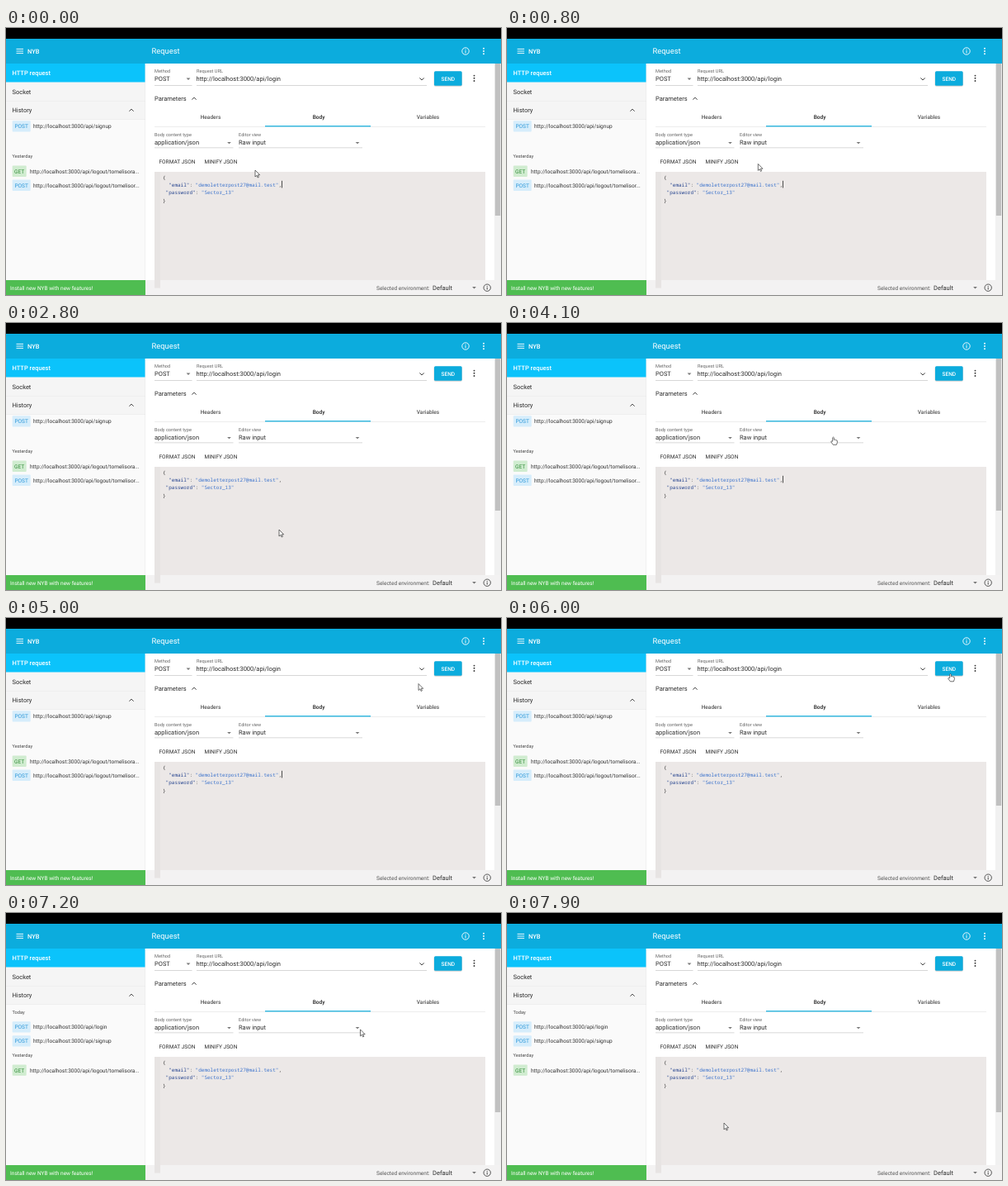
Animation of 600 by 323 pixels, one loop 8000 ms. Source, as an HTML page:

```html
<!DOCTYPE html>
<html lang="en">
<head>
<meta charset="utf-8">
<title>Request</title>
<style>
html, body { margin: 0; width: 100%; height: 100%; overflow: hidden; background: #fff; }
svg { display: block; width: 600px; height: 323px; }
text { font-family: Roboto, Arial, sans-serif; text-rendering: geometricPrecision; white-space: pre; }
.mono { font-family: "Noto Sans Mono", "DejaVu Sans Mono", monospace; }
</style>
</head>
<body>
<svg id="stage" viewBox="0 0 600 323"></svg>
<script>
const NS = "http://www.w3.org/2000/svg";
const stage = document.getElementById("stage");
const LOOP = 8000, STEP = 100;
const SMALL = 5.625, BODY = 6.5625, LARGE = 7.5, TITLE = 9.375;
const BLUE = "#0cacdd", INK = "#2b2b2b", GREY = "#666";

function add(parent, tag, attrs) {
  const el = document.createElementNS(NS, tag);
  for (const k in attrs) el.setAttribute(k, attrs[k]);
  parent.appendChild(el);
  return el;
}
const group = (parent = stage) => add(parent, "g", {});
const rect = (g, x, y, width, height, fill, rx = 0) =>
  add(g, "rect", { x, y, width, height, fill, rx });
const dot = (g, cx, cy, r, fill) => add(g, "circle", { cx, cy, r, fill });
const stroke = (g, d, color, w = 1) =>
  add(g, "path", { d, fill: "none", stroke: color, "stroke-width": w });

// y is the middle of the capital letters
function label(g, str, x, y, size, fill = INK, weight = 400, anchor = "start") {
  const el = add(g, "text", {
    x, y: y + size * 0.355, "font-size": size, fill,
    "font-weight": weight, "text-anchor": anchor
  });
  el.textContent = str;
  return el;
}

const caretDown = (x, y) =>
  add(stage, "path", { d: `M${x - 2.4} ${y - 1.1}h4.8l-2.4 2.4z`, fill: "#777" });
const chevron = (x, y, up) => {
  const s = up ? -1 : 1;
  stroke(stage, `M${x - 2.6} ${y - 1.3 * s}l2.6 ${2.6 * s}l2.6 ${-2.6 * s}`, "#444", 1);
};
const dots = (x, y, fill) => [-3.2, 0, 3.2].forEach(d => dot(stage, x, y + d, 0.95, fill));
function info(x, y, color) {
  add(stage, "circle", { cx: x, cy: y, r: 4.2, fill: "none", stroke: color, "stroke-width": 0.9 });
  stroke(stage, `M${x} ${y - 0.6}v2.9M${x} ${y - 2.3}v1`, color, 0.95);
}
const underline = (x, y, w) => rect(stage, x, y, w, 0.6, "#bdbdbd");

function drawFrame() {
  rect(stage, 0, 0, 600, 323, "#fff");
  rect(stage, 0, 0, 600, 13, "#000");
  rect(stage, 0, 13, 600, 30, BLUE);
  stroke(stage, "M12.5 25.4h8.5M12.5 28h8.5M12.5 30.6h8.5", "#fff", 0.9);
  label(stage, "NYB", 26, 28, LARGE, "#fff", 500);
  label(stage, "Request", 176.5, 28, TITLE, "#fff");
  info(557, 28, "#fff");
  dots(579, 28, "#fff");
}

function drawSidebar() {
  rect(stage, 0, 43, 169, 262, "#fafafa");
  rect(stage, 0, 65.5, 169, 45, "#f5f5f5");
  rect(stage, 0, 43, 169, 22.5, "#0bc3fb");
  rect(stage, 0, 88, 169, 0.5, "#e9e9e9");
  rect(stage, 0, 110.2, 169, 0.5, "#e4e4e4");
  rect(stage, 168.5, 43, 0.5, 262, "#e6e6e6");
  label(stage, "HTTP request", 7.5, 54.3, LARGE, "#fff", 500);
  label(stage, "Socket", 7.5, 77, LARGE);
  label(stage, "History", 7.5, 99.4, LARGE);
  chevron(152, 99.4, true);
  rect(stage, 0, 305, 169, 18, "#4fbd51");
  label(stage, "Install new NYB with new features!", 5, 314.2, BODY, "#fff");
}

function drawRequest() {
  label(stage, "Method", 180, 51.8, SMALL, GREY);
  label(stage, "POST", 180, 61.7, LARGE);
  caretDown(221, 61.7);
  underline(180, 69.2, 45.5);
  label(stage, "Request URL", 231, 51.8, SMALL, GREY);
  label(stage, "http://localhost:3000/api/login", 230.5, 61.7, LARGE);
  chevron(504, 61.7, false);
  underline(231, 69.2, 279);
  rect(stage, 518.6, 52.8, 34.4, 18, "#00000030", 2);
  rect(stage, 519, 52.2, 33.6, 17.6, BLUE, 1.5);
  dots(567.5, 60.8, "#333");

  label(stage, "Parameters", 180, 85.4, LARGE);
  chevron(228, 85.4, true);
  label(stage, "Headers", 248, 107.8, BODY, "#555", 500, "middle");
  label(stage, "Body", 379, 107.8, BODY, "#222", 500, "middle");
  label(stage, "Variables", 511.5, 107.8, BODY, "#555", 500, "middle");
  rect(stage, 180, 119, 401, 0.6, "#e2e2e2");
  rect(stage, 314, 118.2, 128, 1.2, BLUE);

  label(stage, "Body content type", 180, 128.8, SMALL, GREY);
  label(stage, "application/json", 180, 138.8, LARGE);
  caretDown(270.5, 139);
  underline(180, 144.6, 95.5);
  label(stage, "Editor view", 282, 128.8, SMALL, GREY);
  label(stage, "Raw input", 282, 138.8, LARGE);
  caretDown(426, 139);
  underline(282, 144.6, 150);
  label(stage, "FORMAT JSON", 185.5, 161.2, BODY);
  label(stage, "MINIFY JSON", 240.5, 161.2, BODY);
}

function drawEditor() {
  rect(stage, 169, 305, 431, 18, "#f3f2f2");
  rect(stage, 187, 174, 394, 131, "#ece8e7");
  rect(stage, 180, 174, 7, 140.5, "#e7e4e3");
  const code = [
    [["{", "#333"]],
    [['  "email"', "#27458f"], [": ", "#444"], ['"demoletterpost27@mail.test"', "#3c73cc"], [",", "#444"]],
    [[' "password"', "#27458f"], [": ", "#444"], ['"Sector_13"', "#3c73cc"]],
    [["}", "#333"]]
  ];
  code.forEach((parts, i) => {
    const line = label(stage, "", 190, 180.5 + i * 9.4, 6);
    line.setAttribute("class", "mono");
    for (const [str, fill] of parts) add(line, "tspan", { fill }).textContent = str;
  });
  label(stage, "Selected environment:", 449, 314.2, BODY, "#555");
  label(stage, "Default", 517, 314.2, LARGE);
  caretDown(567.5, 314.2);
  info(583.2, 314.2, "#444");
  rect(stage, 592, 43, 8, 262, "#f1f1f1");
}

function historyRow(g, y, method, path) {
  const post = method === "POST", w = post ? 22 : 17;
  rect(g, 7.7, y - 6.8, w, 13.4, post ? "#d6edfb" : "#d0ecd0", 1);
  label(g, method, 7.7 + w / 2, y, BODY, post ? "#2b97d8" : "#2f8a35", 400, "middle");
  label(g, "http://localhost:3000/api/" + path, post ? 33 : 29, y, BODY, "#333");
}

function drawHistories() {
  const logout = "logout/tomelisora...";
  const before = group(), after = group();
  historyRow(before, 119, "POST", "signup");
  label(before, "Yesterday", 7.5, 155.4, SMALL, "#444");
  historyRow(before, 173.4, "GET", logout);
  historyRow(before, 190.4, "POST", "logout/tomelisor...");
  label(after, "Today", 7.5, 119.6, SMALL, "#444");
  historyRow(after, 138, "POST", "login");
  historyRow(after, 155, "POST", "signup");
  label(after, "Yesterday", 7.5, 172.4, SMALL, "#444");
  historyRow(after, 190.2, "GET", logout);
  return [before, after];
}

drawFrame();
drawSidebar();
drawRequest();
drawEditor();
const [oldList, newList] = drawHistories();
const thumb = rect(stage, 592.8, 43, 6.4, 184, "#c1c1c1");
const send = label(stage, "SEND", 535.8, 61.2, BODY, "#fff", 500, "middle");
const caret = rect(stage, 334.1, 184.8, 0.8, 8.6, "#222");
const pointer = group();
const arrow = add(pointer, "path", {
  d: "M0 0V8L1.9 6.3L3.1 9L4.4 8.4L3.2 5.8H5.7Z",
  fill: "#fff", stroke: "#333", "stroke-width": 0.7, "stroke-linejoin": "round"
});
const hand = add(pointer, "path", {
  d: "M-.8 5.2V.7Q0-.6.8.7V3.2Q1.8 2.6 2.3 3.5Q3.2 3 3.6 3.9Q4.8 3.6 4.8 4.8V6.8L3.9 9.3H-.2L-2.7 5.9Q-2.6 4.5-1.6 4.9Z",
  fill: "#fff", stroke: "#333", "stroke-width": 0.7, "stroke-linejoin": "round"
});

// time, x, y of the pointer tip
const PATH = [
  [0, 302, 172], [500, 303, 171], [1500, 309, 140.5], [1900, 312, 150],
  [2600, 331, 250], [2900, 331, 250], [3600, 387, 160], [4100, 395.5, 138],
  [4400, 410, 130], [5000, 500, 79.5], [5700, 537.5, 67.5],
  [6900, 537.5, 67.5], [7600, 263, 254], [8000, 263, 254]
];
function pointerAt(t) {
  let i = 1;
  while (i < PATH.length - 1 && t > PATH[i][0]) i++;
  const a = PATH[i - 1], b = PATH[i];
  const u = (t - a[0]) / (b[0] - a[0]), e = u * u * (3 - 2 * u);
  return [a[1] + (b[1] - a[1]) * e, a[2] + (b[2] - a[2]) * e];
}
const show = (el, on) => el.setAttribute("visibility", on ? "visible" : "hidden");

function render(time) {
  const t = Math.floor((time % LOOP) / STEP) * STEP;
  const [x, y] = pointerAt(t);
  pointer.setAttribute("transform", `translate(${x.toFixed(2)} ${y.toFixed(2)})`);
  const linked = (t >= 3900 && t < 4400) || (t >= 5400 && t < 7000);
  show(hand, linked);
  show(arrow, !linked);
  show(caret, t < 6500 && (t + 340) % 1060 < 530);
  const done = t >= 7100;
  show(oldList, !done);
  show(newList, done);
  thumb.setAttribute("height", done ? 198 : 184);
  send.textContent = t >= 6500 && !done ? "ABORT" : "SEND";
}

const start = performance.now();
function tick() {
  render(performance.now() - start);
  requestAnimationFrame(tick);
}
tick();
</script>
</body>
</html>
```
